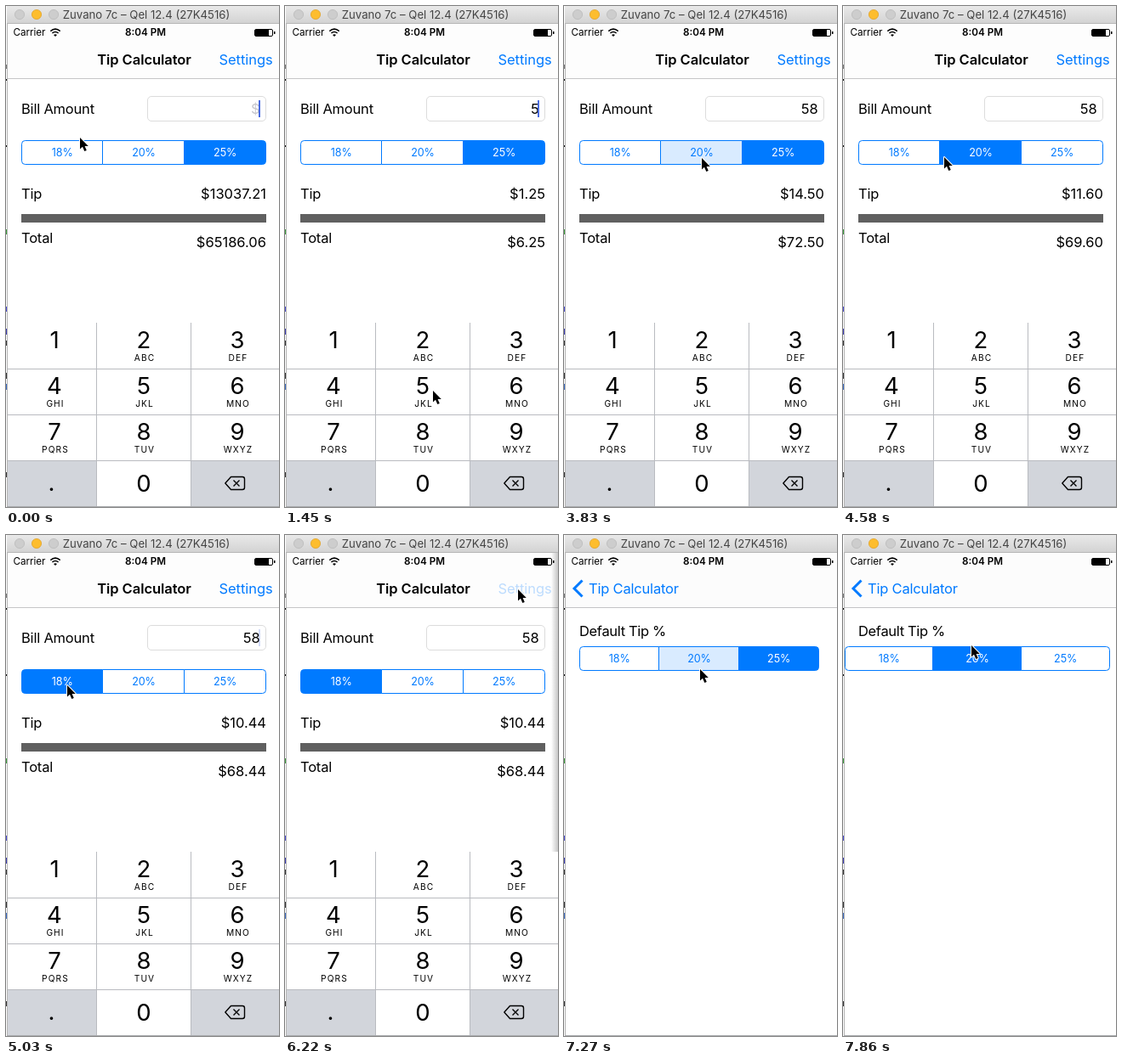
An HTML page that plays this animation: 321x590 px, repeating every 8000 ms.

```html
<!DOCTYPE html>
<html lang="en">
<head>
<meta charset="utf-8">
<title>Tip Calculator</title>
<style>
  html, body { margin: 0; width: 100%; height: 100%; overflow: hidden; background: #fff; }
  svg { display: block; font-family: Inter, Roboto, sans-serif; }
</style>
</head>
<body>
<svg id="stage" width="321" height="590" viewBox="0 0 321 590"></svg>
<script>
const stage = document.getElementById('stage');
const LOOP = 8000, BLUE = '#007aff', PUSH = 6220;

const bursts = [
  [130, 1160, 8], [1300, 2040, 6], [2640, 3540, 7], [3690, 4130, 4],
  [4430, 5330, 7], [5480, 5780, 3], [6070, 6970, 7], [7120, 7860, 6]
];

// Pointer stops: time, x, y
const stops = [
  [0, 87, 155], [1160, 174, 445], [1300, 174, 453], [1450, 174, 453],
  [1892, 172, 506], [2500, 172, 506], [3540, 162, 179], [4300, 162, 179],
  [4880, 72, 177], [5030, 72, 177], [5330, 239, 96], [5780, 274, 64],
  [6670, 274, 64], [6970, 165, 150], [7120, 160, 158], [7564, 160, 158],
  [7860, 151, 130]
];

function heldTime(t) {
  let held = 0;
  for (const [from, to, n] of bursts) {
    if (t < from) break;
    const step = (to - from) / (n - 1);
    held = from + step * Math.min(n - 1, Math.floor((t - from) / step + 0.1));
  }
  return held;
}

function pointerAt(t) {
  const i = stops.findIndex(s => s[0] > t);
  if (i < 0) return stops[stops.length - 1].slice(1);
  const [t0, x0, y0] = stops[i - 1], [t1, x1, y1] = stops[i];
  const u = (t - t0) / (t1 - t0), e = u * u * (3 - 2 * u);
  return [x0 + (x1 - x0) * e, y0 + (y1 - y0) * e].map(Math.round);
}

function pushProgress(t) {
  const s = (t - PUSH) * 0.0195;
  if (s <= 0) return 0;
  return t > 6660 ? 1 : 1 - (1 + s) * Math.exp(-s);
}

const rect = (x, y, w, h, fill, more = '') =>
  `<rect x="${x}" y="${y}" width="${w}" height="${h}" fill="${fill}" ${more}/>`;
const line = (d, color, more = '') =>
  `<path d="${d}" fill="none" stroke="${color}" ${more}/>`;
const text = (x, y, str, { size = 16.5, anchor = 'start', fill = '#000', weight = 400, gap = -0.2, alpha = 1 } = {}) =>
  `<text x="${x}" y="${y}" font-size="${size}" text-anchor="${anchor}" fill="${fill}" font-weight="${weight}" letter-spacing="${gap}" opacity="${alpha}">${str}</text>`;
const group = (dx, body) => `<g transform="translate(${dx} 0)">${body}</g>`;

function segments(x, y, w, selected, pressed) {
  const h = 28;
  const edge = i => Math.round(x + i * w / 3) - 0.5;
  let out = '';
  ['18%', '20%', '25%'].forEach((label, i) => {
    const l = i === 0 ? 4 : 0, r = i === 2 ? 4 : 0;
    const cx = edge(i), cw = edge(i + 1) - cx;
    const fill = i === selected ? BLUE : i === pressed ? '#d9ebff' : '#fff';
    out += `<path d="M${cx + l} ${y}h${cw - l - r}q${r} 0 ${r} ${r}v${h - 2 * r}q0 ${r} ${-r} ${r}` +
      `h${l + r - cw}q${-l} 0 ${-l} ${-l}v${2 * l - h}q0 ${-l} ${l} ${-l}z" fill="${fill}" stroke="${BLUE}"/>`;
    out += text(x + (i + 0.5) * w / 3, y + 18.5, label,
      { size: 12.6, anchor: 'middle', fill: i === selected ? '#fff' : BLUE, gap: -0.1 });
  });
  return out;
}

function caretAlpha(t) {
  if (t >= PUSH) return 0;
  if (t >= 1290 && t < 2600) return 1;
  const phase = (t - 4530 + 1050 * 5) % 1050;
  return phase < 499 ? 0 : phase < 560 ? 0.25 : 1;
}

function mainView(t) {
  const typed = t < 1440 ? '' : t < 1880 ? '5' : '58';
  const bill = typed ? +typed : 52148.85;
  const selected = t < 3960 ? 2 : t < 5020 ? 1 : 0;
  const pressed = t >= 3680 && t < 3960 ? 1 : t >= 4870 && t < 5020 ? 0 : -1;
  const tip = bill * [0.18, 0.2, 0.25][selected];
  const right = { anchor: 'end', gap: 0 };
  return rect(0, 21, 418, 569, '#fff') +
    text(18, 127, 'Bill Amount') +
    rect(166.5, 106.5, 139, 29, '#fff', 'rx="4.5" stroke="#dcdcdc"') +
    (typed ? text(298.7, 127, typed, right) : text(298.7, 127, '$', { ...right, fill: '#c7c7cd' })) +
    rect(297, 111, 2, 20, '#4a6ce0', `opacity="${caretAlpha(t)}"`) +
    segments(18.5, 158.5, 287, selected, pressed) +
    text(18, 227, 'Tip') + text(306, 227, '$' + tip.toFixed(2), right) +
    rect(18, 245, 288, 10, '#606060') +
    text(18, 279, 'Total') + text(306, 284, '$' + (bill + tip).toFixed(2), right);
}

function settingsView(t) {
  const chosen = t >= 7400;
  const pressed = t >= 7250 && !chosen ? 1 : -1;
  return rect(0, 21, 330, 569, '#fff') +
    text(16, 119, 'Default Tip %', { gap: -0.33 }) +
    (chosen ? segments(0.5, 131.5, 311, 1, -1) : segments(16.5, 131.5, 281, 2, pressed));
}

function keypad(t) {
  const letters = ['', 'ABC', 'DEF', 'GHI', 'JKL', 'MNO', 'PQRS', 'TUV', 'WXYZ'];
  const centers = [57, 162, 272];
  const digit = { size: 27.5, anchor: 'middle', gap: 0 };
  let out = rect(2, 373, 320, 217, '#fff') +
    rect(2, 535, 105, 55, '#d2d5db') + rect(217, 535, 105, 55, '#d2d5db');
  if (t >= 1290 && t < 1440) out += rect(107, 428, 110, 54, '#d2d5db');
  out += line('M2 427.5H322M2 481.5H322M2 535.5H322M106.5 373V590M217.5 373V590', '#b9bbc0');
  letters.forEach((str, i) => {
    const x = centers[i % 3], y = 403 + 54 * Math.floor(i / 3);
    out += text(x, y, i + 1, digit) +
      text(x + 1, y + 15, str, { size: 10.2, anchor: 'middle', gap: 1.1 });
  });
  return out + text(162, 572, '0', digit) + text(53.5, 571, '.', digit) +
    line('M264.5 554.5H278q2.5 0 2.5 2.5v10q0 2.5-2.5 2.5H264.5L257.8 562zM267.5 558.5l7 7m0-7l-7 7', '#000',
      'stroke-width="1.4" stroke-linejoin="round"');
}

const navBack = rect(2, 21, 320, 64, '#fcfcfc', 'opacity=".7"') + line('M2 85.5H322', '#b8b8ba', 'opacity=".8"');

function navItems(t, p) {
  const since = t - PUSH;
  const settings = t < 6060 ? 1 : Math.max(0, 0.25 * (1 - Math.max(0, since) / 350));
  const shift = 80 * p;
  let out = '';
  if (p < 1) out += text(162.5 - shift, 69, 'Tip Calculator',
    { anchor: 'middle', weight: 600, gap: -0.05, alpha: Math.max(0, 1 - 1.3 * p) });
  if (p > 0) out += text(109 - shift, 69, 'Tip Calculator', { fill: BLUE, alpha: p }) +
    line('M21.5 53.5L12 63l9.5 9.5', BLUE, `stroke-width="3" opacity="${Math.min(1, since / 450)}"`);
  return out + text(313.7, 69, 'Settings', { anchor: 'end', fill: BLUE, gap: -0.05, alpha: settings });
}

const statusBar =
  text(8.5, 35, 'Carrier', { size: 11.7, gap: -0.05 }) +
  line('M52.3 29.6q5.7-5 11.4 0M54.4 32q3.6-3 7.2 0', '#000', 'stroke-width="1.6"') +
  '<path d="M56 33.9q2-1.5 4 0l-2 2.2z"/>' +
  text(164, 35, '8:04 PM', { size: 11.7, anchor: 'middle', weight: 600, gap: 0 }) +
  rect(292.5, 27.5, 21, 8, 'none', 'rx="1.5" stroke="#000"') +
  rect(293, 28, 16, 7, '#000') + rect(315, 30, 1.5, 3, '#000');

const marks = [
  [69, 5, '#777'], [86, 2, '#111'], [164, 2, '#111'], [263, 6, '#3a9a3a'], [354, 6, '#4a4ad0'],
  [380, 7, '#3a3ab0'], [394, 6, '#333'], [432, 7, '#333'], [445, 7, '#3a6ac0'], [549, 6, '#333']
];
const windowFrame =
  rect(0, 0, 2, 590, '#fff') +
  marks.map(([y, h, fill]) => rect(0, y, 1.3, h, fill)).join('') +
  line('M1.5 20V590', '#b4b4b4') + line('M1 589.5H321', '#a9abae') +
  rect(1, 0, 320, 21, 'url(#bar)') + line('M1 20.5H321', '#b6b6b6') +
  [[16, '#cdcdcd', '#bababa'], [36, '#fdbd2e', '#e0a32a'], [56, '#cdcdcd', '#bababa']]
    .map(([x, fill, rim]) => `<circle cx="${x}" cy="10" r="5.6" fill="${fill}" stroke="${rim}" stroke-width=".8"/>`).join('') +
  text(165, 15, 'Zuvano 7c – Qel 12.4 (27K4516)', { size: 13.2, anchor: 'middle', fill: '#444', gap: 0 });

const defs = `<defs>
  <linearGradient id="bar" x2="0" y2="1"><stop stop-color="#e9e9e9"/><stop offset="1" stop-color="#d2d2d2"/></linearGradient>
  <linearGradient id="edge"><stop stop-color="#000" stop-opacity="0"/><stop offset="1" stop-color="#000" stop-opacity=".25"/></linearGradient>
</defs>`;

function render(t) {
  const p = pushProgress(t);
  const left = 2 + Math.round(320 * (1 - p));
  const [x, y] = pointerAt(t);
  let out = defs + rect(0, 0, 321, 590, '#fff');
  if (p < 1) out += group(-96 * p, mainView(t)) + navBack + rect(0, 21, 321, 569, '#000', `opacity="${0.1 * p}"`);
  if (t >= PUSH - 5) out += group(left, rect(-9, 21, 9, 569, 'url(#edge)') + settingsView(t));
  if (p > 0) out += navBackFrom(left);
  out += navItems(t, p);
  if (p < 1) out += group(-320 * p, keypad(t));
  out += statusBar + windowFrame +
    `<path transform="translate(${x} ${y})" d="M0 0v13.6l3-2.8 2.3 5.2 2.5-1.1-2.2-5h4.2z" ` +
    'stroke="#fff" stroke-width="2" stroke-linejoin="round" paint-order="stroke"/>';
  stage.innerHTML = out;
}

// Bar of the incoming screen, starting at its left edge
function navBackFrom(left) {
  return rect(left, 21, 322 - left, 64, '#fcfcfc') + line(`M${left} 85.5H322`, '#c4c4c6');
}

let shown = -1;
function tick(now) {
  const t = heldTime(now % LOOP);
  if (t !== shown) render(shown = t);
  requestAnimationFrame(tick);
}
render(0);
requestAnimationFrame(tick);
</script>
</body>
</html>
```
